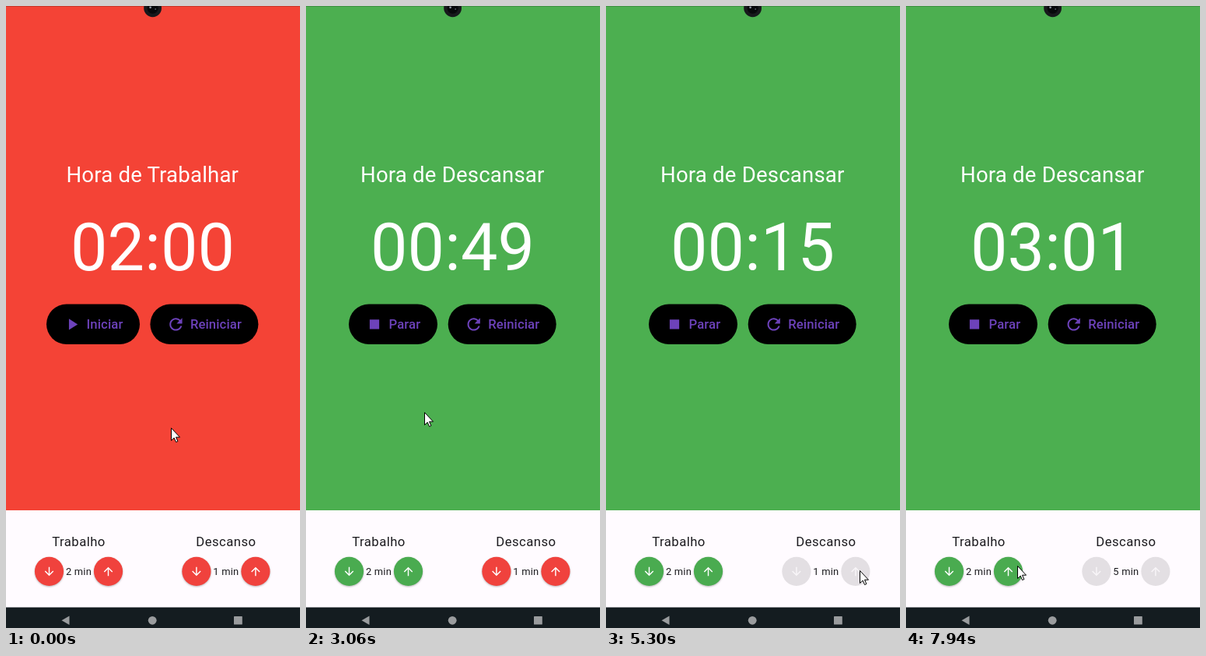
These frames come from a looping animation (378 px wide and 798 px high, 8 s). An HTML page:

```html
<!DOCTYPE html>
<html lang="pt">
<head>
<meta charset="utf-8">
<title>Pomodoro</title>
<style>
  html, body { margin: 0; width: 100%; height: 100%; overflow: hidden; background: #f44336; }
  svg { display: block; width: 378px; height: 798px; font-family: Roboto, sans-serif; }
  .mid { text-anchor: middle; }
  .title { font-size: 27.6px; letter-spacing: .18px; fill: #fff; }
  .time { font-size: 84.5px; letter-spacing: .2px; fill: #fff; }
  .label { font-size: 16.7px; letter-spacing: .46px; fill: #1c1b1f; }
  .minutes { font-size: 12.9px; letter-spacing: .23px; fill: #1c1b1f; }
  .pill-text { font-size: 16.7px; font-weight: 500; letter-spacing: .1px; }
  .purple { fill: #6d42bb; }
  .raised { filter: drop-shadow(0 1px 1px rgba(0, 0, 0, .28)); }
</style>
</head>
<body>
<svg viewBox="0 0 378 798">
  <defs>
    <path id="down" d="M20 12l-1.41-1.41L13 16.17V4h-2v12.17l-5.58-5.59L4 12l8 8 8-8z" transform="scale(.72) translate(-12 -12)"/>
    <clipPath id="pillClip"><rect x="52" y="382.5" width="120" height="51.5" rx="25.75"/></clipPath>
  </defs>

  <rect id="bg" width="378" height="648"/>
  <rect width="378" height="1" fill="#000" opacity=".18"/>
  <circle cx="188.6" cy="2.8" r="11.4" fill="#17181c"/>
  <circle cx="188.6" cy="2.8" r="7" fill="#07080b"/>
  <circle cx="185.6" cy="1.8" r="1.4" fill="#8d93a0"/>
  <circle cx="192.2" cy="4" r=".9" fill="#555b68"/>

  <text id="title" class="mid title" x="188.3" y="226"></text>
  <text id="time" class="mid time" x="188.6" y="338.5"></text>

  <g id="main">
    <rect id="mainPill" y="382.5" height="51.5" rx="25.75"/>
    <path id="mainIcon" class="purple" transform="translate(33 408.4) scale(1.02) translate(-12 -12)"/>
    <text id="mainText" class="pill-text purple" x="51.5" y="414.4"></text>
  </g>
  <circle id="ripple" cx="117" cy="415" fill="#6d42bb" clip-path="url(#pillClip)"/>
  <g id="reset">
    <rect y="382.5" width="139" height="51.5" rx="25.75"/>
    <path class="purple" transform="translate(33 408.4) scale(1.02) translate(-12 -12)" d="M17.65 6.35C16.2 4.9 14.21 4 12 4c-4.42 0-7.99 3.58-7.99 8s3.57 8 7.99 8c3.73 0 6.84-2.55 7.73-6h-2.08c-.82 2.33-3.04 4-5.65 4-3.31 0-6-2.69-6-6s2.69-6 6-6c1.66 0 3.14.69 4.22 1.78L13 11h7V4l-2.35 2.35z"/>
    <text class="pill-text purple" x="51.5" y="414.4">Reiniciar</text>
  </g>

  <rect y="647" width="378" height="125" fill="#fffbff"/>
  <g id="work" transform="translate(93.5 0)">
    <text class="mid label" y="693">Trabalho</text>
    <text class="mid minutes" y="729.6">2 min</text>
  </g>
  <g id="rest" transform="translate(282.9 0)">
    <text class="mid label" y="693">Descanso</text>
    <text class="mid minutes" y="729.6" id="restMinutes"></text>
  </g>

  <rect y="771.5" width="378" height="26.5" fill="#141c20"/>
  <g fill="#9a9c9e">
    <path d="M71.5 788.3l10-5.7v11.4z"/>
    <circle cx="188.2" cy="788.3" r="5.4"/>
    <rect x="293" y="783" width="10.8" height="10.6" rx=".6"/>
  </g>

  <path id="cursor" d="M.5.5v16l3.7-3.4 2.4 5.4 2.3-1-2.4-5.3h5z" fill="#fff" stroke="#000" stroke-linejoin="round"/>
</svg>
<script>
const $ = id => document.getElementById(id);
const LOOP = 8000, RUN = 1300, STEP = 79.7;
const RED = '#f44336', GREEN = '#4caf50', GREY = '#e3dfe3';
const BUTTON = { stop: '#f0423d', work: '#f0423d', rest: '#4aab50' };

// time, x, y of the pointer tip
const POINTER = [
  [190, 212, 541], [670, 117, 428], [910, 117, 428], [1150, 117, 415], [1690, 117, 415],
  [2495, 156, 535], [3300, 150, 515], [3611, 140, 499], [3930, 142, 503], [4567, 281, 727],
  [4730, 326, 729], [4900, 326, 724], [6560, 326, 724], [7118, 291, 603], [7380, 291, 603], [7915, 143, 718]
];
// step, countdown ticks since the start
const TICKS = [[4.87, 0], [15, 78], [29, 186], [41, 279], [59, 417], [73, 524], [83, 604]];
const REST_CLICKS = [5850, 6180, 6340, 6500];

function sample(keys, t) {
  const i = keys.findIndex(k => k[0] > t);
  if (i === 0) return keys[0].slice(1);
  if (i < 0) return keys[keys.length - 1].slice(1);
  const a = keys[i - 1], b = keys[i], p = (t - a[0]) / (b[0] - a[0]);
  return a.slice(1).map((v, j) => v + (b[j + 1] - v) * p);
}

function timerAt(t) {
  const step = (t - RUN) / STEP;
  if (step < TICKS[0][0]) return { mode: 'stop', left: 120 };
  const ticks = Math.round(sample(TICKS, step)[0]);
  const round = Math.min(2, Math.floor(ticks / 182)), r = ticks - round * 182;
  return r < 121 ? { mode: 'work', left: 120 - r }
                 : { mode: 'rest', left: (round === 2 ? 300 : 60) - (r - 121) };
}

function addButtons(group) {
  return [-38, 38].map((x, i) => {
    $(group).insertAdjacentHTML('beforeend',
      `<g transform="translate(${x} 725.4)"><circle r="18.6"/><use href="#down" transform="rotate(${i * 180})"/></g>`);
    return $(group).lastChild;
  });
}
const buttons = { work: addButtons('work'), rest: addButtons('rest') };

// a disabled button keeps its old colour for 200 ms
function paintButtons(kind, mode, before) {
  const disabled = mode === kind && before === kind;
  const fill = disabled ? GREY : BUTTON[mode === kind ? before : mode];
  for (const b of buttons[kind]) {
    b.children[0].setAttribute('fill', fill);
    b.children[0].setAttribute('class', disabled ? '' : 'raised');
    b.children[1].setAttribute('fill', disabled ? '#f8f5f8' : '#fff');
  }
}

function draw(now) {
  const raw = now % LOOP;
  const t = raw < RUN ? 190 + 80 * Math.floor((raw - 190) / 80)
                      : RUN + STEP * Math.floor((raw - RUN) / STEP + 1e-6);
  const { mode, left } = timerAt(t), before = timerAt(t - 200).mode;
  const running = mode !== 'stop';
  const two = n => String(n).padStart(2, '0');

  $('bg').setAttribute('fill', mode === 'rest' ? GREEN : RED);
  $('title').textContent = mode === 'rest' ? 'Hora de Descansar' : 'Hora de Trabalhar';
  $('time').textContent = two(Math.floor(left / 60)) + ':' + two(left % 60);

  $('main').setAttribute('transform', `translate(${running ? 55 : 52} 0)`);
  $('mainPill').setAttribute('width', running ? 114 : 120);
  $('mainIcon').setAttribute('d', running ? 'M6 6h12v12H6z' : 'M8 5v14l11-7z');
  $('mainText').textContent = running ? 'Parar' : 'Iniciar';
  $('reset').setAttribute('transform', `translate(${running ? 182.7 : 185.4} 0)`);

  const press = t >= RUN && !running ? (t - RUN + STEP) / 400 : 0;
  $('ripple').setAttribute('r', 75 * press);
  $('ripple').setAttribute('opacity', press ? .12 : 0);

  paintButtons('work', mode, before);
  paintButtons('rest', mode, before);
  $('restMinutes').textContent = 1 + REST_CLICKS.filter(c => t >= c).length + ' min';

  const [x, y] = sample(POINTER, t);
  $('cursor').setAttribute('transform', `translate(${Math.round(x)} ${Math.round(y)})`);
}

const start = performance.now();
function tick() {
  draw(performance.now() - start);
  requestAnimationFrame(tick);
}
tick();
</script>
</body>
</html>
```
